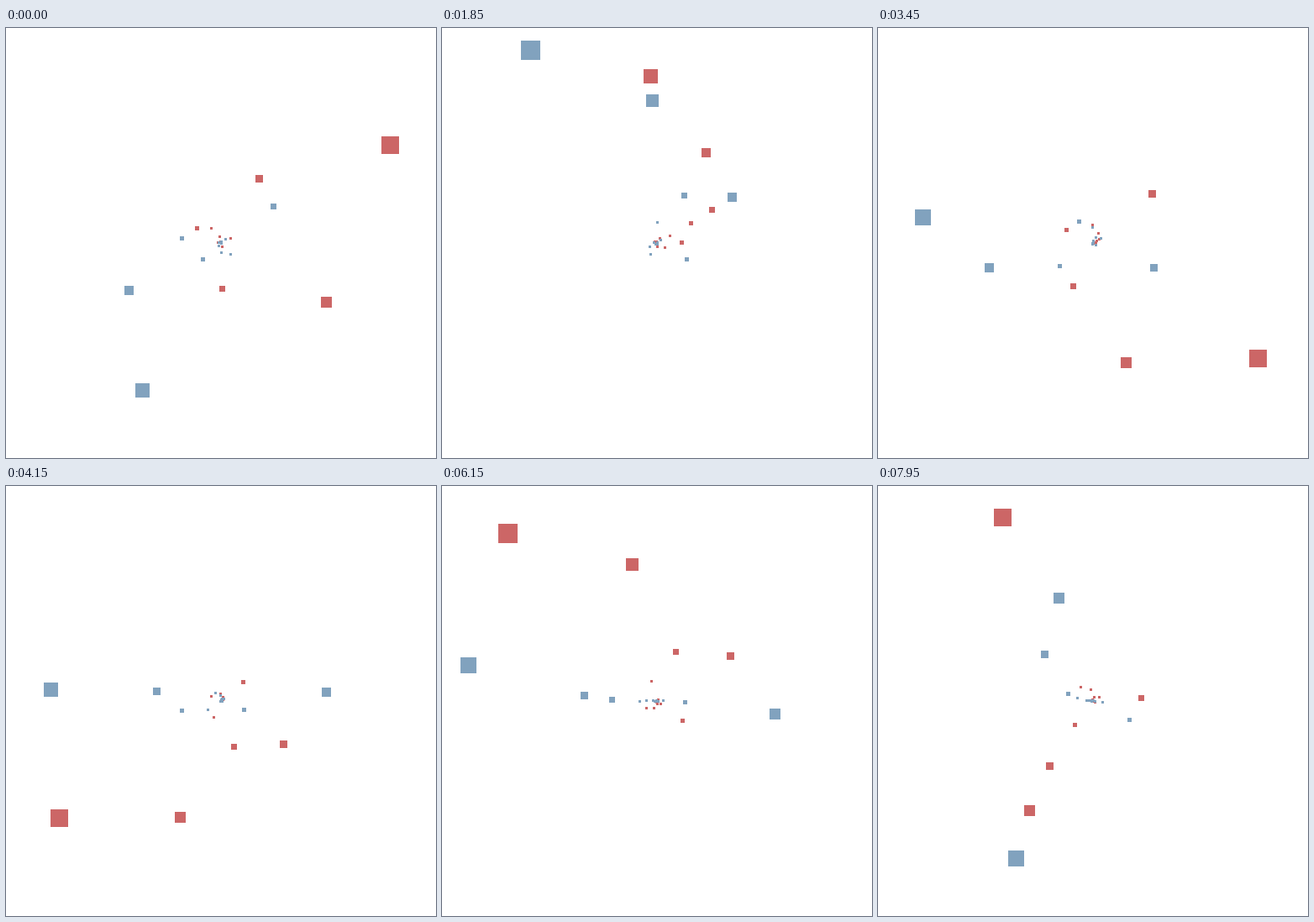
An HTML page with a canvas that plays this animation: 512 px wide and 512 px high, repeating every 8 s.

```html
<!DOCTYPE html>
<html lang="en">
<head>
<meta charset="utf-8">
<title>Fibonacci and Lucas squares</title>
<style>
  html, body { margin: 0; width: 100%; height: 100%; overflow: hidden; background: #fff; }
  canvas { display: block; width: 512px; height: 512px; }
</style>
</head>
<body>
<canvas id="stage" width="512" height="512"></canvas>
<script>
const STEP_MS = 50, STEPS = 160, HALVING_STEPS = 10;
const CENTER = 256, PHI = (1 + Math.sqrt(5)) / 2;
const FIRST = -14, LAST = 25, SEED = 10;
const ctx = document.getElementById("stage").getContext("2d");

// Each angle, in degrees, is the sum of the two before it; run both ways from the seeds.
function fibonacciAngles(a, b) {
  const angles = { [SEED]: a, [SEED + 1]: b };
  for (let n = SEED + 2; n <= LAST; n++) angles[n] = (angles[n - 1] + angles[n - 2]) % 360;
  for (let n = SEED - 1; n >= FIRST; n--) angles[n] = (angles[n + 2] - angles[n + 1]) % 360;
  return angles;
}

const families = [
  { color: "#cc6666", radius: 233, angles: fibonacciAngles(250.7043, 215.8581) },
  { color: "#81a2be", radius: 199, angles: fibonacciAngles(4.7555, 176.2549) }
];

function drawFamily({ color, radius, angles }, step) {
  ctx.fillStyle = color;
  for (let n = LAST; n >= FIRST; n--) {
    const r = radius * PHI ** (n + 1) * 2 ** (-step / HALVING_STEPS);
    if (r > 420) continue;
    if (r < 0.5) break;
    const angle = angles[n] * Math.PI / 180;
    const x = Math.floor(CENTER + r * Math.cos(angle));
    const y = Math.floor(CENTER - r * Math.sin(angle));
    const half = Math.floor(10 * r / CENTER) + 1;
    ctx.fillRect(x - half, y - half, 2 * half + 1, 2 * half + 1);
  }
}

function draw(step) {
  ctx.fillStyle = "#fff";
  ctx.fillRect(0, 0, 512, 512);
  for (const family of families) drawFamily(family, step);
}

const start = performance.now();
function tick() {
  const elapsed = Math.max(0, performance.now() - start);
  draw(Math.floor(elapsed / STEP_MS) % STEPS);
  requestAnimationFrame(tick);
}
tick();
</script>
</body>
</html>
```
